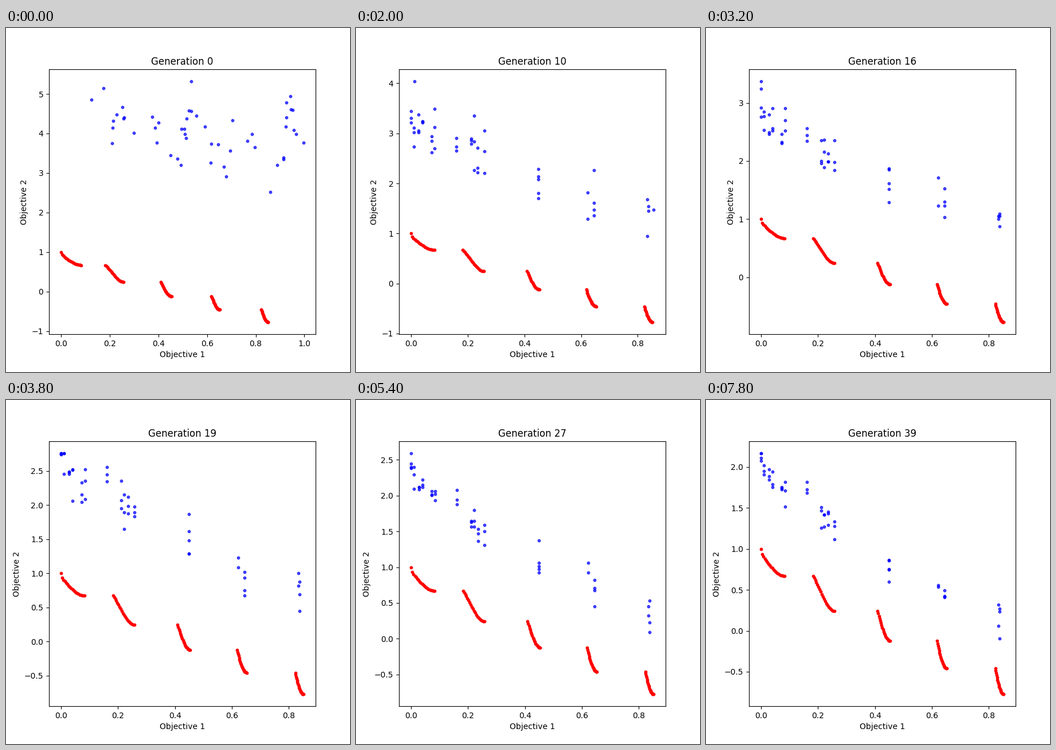
These frames come from a looping animation (600x600 px, 8 s). A matplotlib script:

```python
import numpy as np
import matplotlib.pyplot as plt
from matplotlib.animation import FuncAnimation

GENERATIONS = 40
STEP_MS = 200
SIZE = 48   # individuals, besides the two extreme ones
LIFE = 6    # generations before an individual is replaced

# Intervals of f1 on which the ZDT3 Pareto front is defined
REGIONS = [(0, 0.0830015), (0.1822287, 0.2577624), (0.4093137, 0.4538821),
           (0.6183968, 0.6525117), (0.8233318, 0.8518329)]

# f1 values that the offspring settle on
COLUMNS = [0, .010, .027, .040, .0725, .0835, .160, .2115, .2215, .2355, .258,
           .449, .449, .6225, .6445, .6445, .834, .838]

# Key positions of the topmost and rightmost individuals
KEY_GENS = [0, 6, 13, 19, 27, 33, 39]
TOP_Y = [5.32, 4.12, 3.98, 2.76, 2.59, 2.295, 2.167]
TOP_X = [.535, .027, 0, 0, 0, 0, 0]
RIGHT_X = [.9965, .879, .838, .838, .838, .838, .838]


def zdt3(x):
    return 1 - np.sqrt(x) - x * np.sin(10 * np.pi * x)


def level(gen):
    """Mean distance from the Pareto front, decaying over the generations."""
    return 0.75 + 2.9 * np.exp(-gen / 15)


front_x = np.concatenate([np.linspace(a, b, 20) for a, b in REGIONS])
front_y = zdt3(front_x)

rng = np.random.default_rng(4)
start_x = np.sort(rng.uniform(0.05, 0.98, SIZE))
column_x = rng.permutation(np.resize(COLUMNS, SIZE))
phase = np.arange(SIZE) * LIFE // SIZE
noise = rng.standard_normal((SIZE, GENERATIONS // LIFE + 2)).clip(-2, 2)


def population(gen):
    """Individuals stand still until a closer one takes their place."""
    top_x, top_y, right_x = (np.interp(gen, KEY_GENS, key)
                             for key in (TOP_X, TOP_Y, RIGHT_X))
    life = (gen + phase) // LIFE
    x = np.where(life == 0, start_x, column_x)
    mean = level(np.where(life == 0, 0, life * LIFE - phase + LIFE / 2))
    spread = 0.1 * noise[np.arange(SIZE), life]
    y = zdt3(x) + mean * (1 + spread) - 0.35 * (x - 0.35)
    y = np.minimum(y, top_y)
    right_y = zdt3(right_x) + level(gen)
    return np.append(x, [top_x, right_x]), np.append(y, [top_y, right_y])


fig, ax = plt.subplots(figsize=(6, 6), dpi=100)


def draw(gen):
    ax.clear()
    ax.scatter(*population(gen), s=10, c="blue", alpha=0.7)
    ax.scatter(front_x, front_y, s=10, c="red")
    ax.set_title(f"Generation {gen}")
    ax.set_xlabel("Objective 1")
    ax.set_ylabel("Objective 2")


anim = FuncAnimation(fig, draw, frames=GENERATIONS, interval=STEP_MS,
                     init_func=lambda: None, repeat=True, repeat_delay=0)
plt.show()
```
